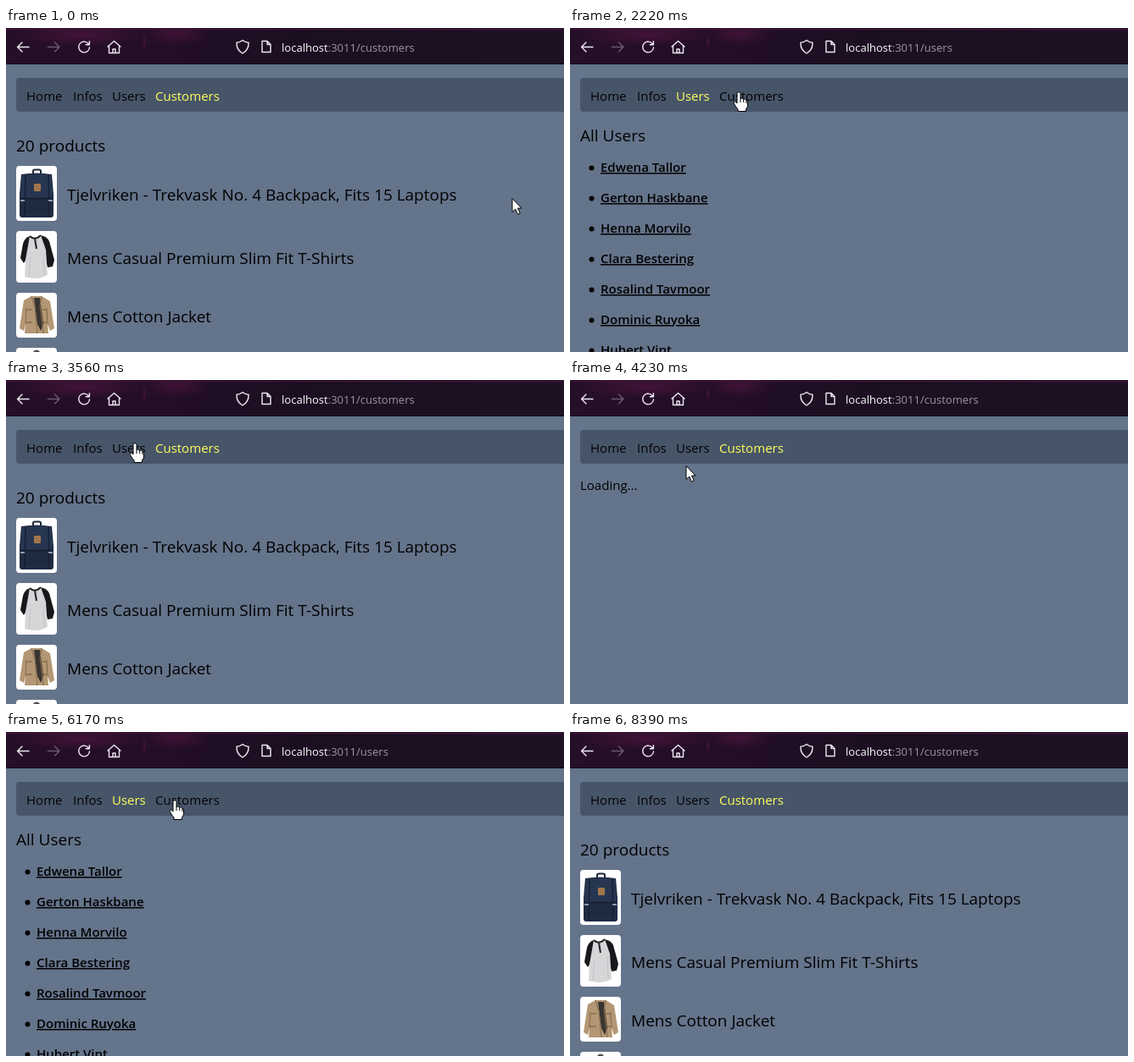
An HTML page for the animation above (8.7 s loop, 658 px wide and 383 px high).

```html
<!DOCTYPE html>
<html lang="en">
<head>
<meta charset="utf-8">
<title>Customers and users</title>
<style>
  html, body { margin: 0; width: 100%; height: 100%; overflow: hidden; background: #64748b; }
  svg { display: block; width: 658px; height: 383px; }
  text { font: 15px "Open Sans", "Noto Sans", sans-serif; white-space: pre; }
  .big { font-size: 19px; }
  .url { font-size: 13.05px; fill: #9c95a3; }
  .url .host { fill: #fbfbfe; }
  .person { font-size: 15px; font-weight: 600; }
  .icon { fill: none; stroke: #ece8f0; stroke-width: 1.4; stroke-linecap: round; stroke-linejoin: round; }
  .cursor { fill: #fff; stroke: #000; stroke-width: 1; stroke-linejoin: round; }
</style>
</head>
<body>
<svg viewBox="0 0 658 383">
  <defs>
    <linearGradient id="bar">
      <stop offset="0" stop-color="#260f28"/>
      <stop offset=".3" stop-color="#220e26"/>
      <stop offset=".55" stop-color="#1c0f21"/>
      <stop offset="1" stop-color="#1f1124"/>
    </linearGradient>
    <radialGradient id="glow">
      <stop offset="0" stop-color="#8a1d5c" stop-opacity=".3"/>
      <stop offset="1" stop-color="#8a1d5c" stop-opacity="0"/>
    </radialGradient>
  </defs>

  <rect width="658" height="383" fill="#64748b"/>
  <g id="toolbar">
    <rect width="658" height="43" fill="url(#bar)"/>
    <g fill="url(#glow)">
      <ellipse cx="90" cy="8" rx="80" ry="14"/>
      <ellipse cx="200" cy="7" rx="40" ry="14"/>
      <ellipse cx="163" cy="16" rx="3" ry="10"/>
    </g>
    <path d="M0 1.5H658" stroke="#47183f"/>
    <path d="M0 42.5H658" stroke="#100a15"/>
    <path class="icon" d="M27 22.500H13.500M19 17L13.500 22.500L19 28"/>
    <path class="icon" stroke-opacity=".35" d="M49.500 22.500H63M57.500 17L63 22.500L57.500 28"/>
    <path class="icon" d="M97.500 19A6.400 6.400 0 1 0 98.500 23M98.400 15.800V19.800H94.300"/>
    <path class="icon" d="M120 22L127.500 15.500L135 22M121.500 21V29.500H133.500V21M126 29.500V25H129V29.500"/>
    <path class="icon" d="M279 14.500Q282.500 17.300 286 17.300Q286.500 26 279 30Q271.500 26 272 17.300Q275.500 17.300 279 14.500Z"/>
    <path class="icon" d="M302 15.500H308L312 19.500V28.500H302ZM308 15.500V19.500H312"/>
    <text class="url" x="325" y="28"><tspan class="host">localhost</tspan>:3011/<tspan id="path">customers</tspan></text>
  </g>

  <rect x="12" y="59" width="660" height="40" rx="4" fill="#475569"/>
  <text x="24" y="86">Home</text>
  <text x="79" y="86">Infos</text>
  <text x="125" y="86" id="navUsers">Users</text>
  <text x="176" y="86" id="navCustomers">Customers</text>

  <text id="loading" x="12" y="130">Loading...</text>

  <g id="users">
    <text class="big" x="12" y="134">All Users</text>
  </g>

  <g id="customers">
    <text class="big" x="12" y="146">20 products</text>
    <g fill="#fff">
      <rect x="12" y="163" width="48" height="65" rx="4"/>
      <rect x="12" y="240" width="48" height="61" rx="4"/>
      <rect x="12" y="313" width="48" height="53" rx="4"/>
      <rect x="12" y="378" width="48" height="53" rx="4"/>
    </g>
    <g id="backpack">
      <path d="M32 173V169Q32 167.500 34 167.500H39Q41 167.500 41 169V173" fill="none" stroke="#1b2537" stroke-width="2"/>
      <path d="M18 173Q36 170 54 173L56 196V221Q56 224 53 224H19Q16 224 16 221V196Z" fill="#1f2b41"/>
      <path d="M19 174Q36 171 53 174L55 200H17Z" fill="#273650"/>
      <path d="M17 202H55M23 174L22 222M50 174L51 222" fill="none" stroke="#162036" stroke-width="1.500"/>
      <path d="M17 204H22M50 204H55" stroke="#b8c0cc" stroke-width="1.500"/>
      <rect x="33" y="184" width="8" height="9" rx="1" fill="#a2764c"/>
    </g>
    <g id="shirt">
      <path d="M28 246Q22 248 20 255L17 272L21 278L27 268Z" fill="#17181b"/>
      <path d="M41 245Q49 247 51 252L57 274L55 282L49 283L44 264Z" fill="#17181b"/>
      <path d="M28 246Q34 249 41 245L47 262L49 292Q37 299 22 294L23 274Z" fill="#d6d6d8"/>
      <path d="M28 246Q34 252 41 245M34 249L36 261" fill="none" stroke="#222327" stroke-width="2"/>
      <path d="M29 270L27 294M44 266L45 292" stroke="#c3c3c8"/>
    </g>
    <g id="jacket">
      <path d="M30 317L21 322L16 355L21 358L23 350L22 361L50 361L49 350L52 358L57 355L52 323L42 317Z" fill="#b39673"/>
      <path d="M33 319H40L44 350L41 358L37 350Z" fill="#3a3431"/>
      <path d="M30 317L34 330L37 361M42 317L40 328L44 361M23 350L24 331M49 350L48 331" fill="none" stroke="#846a4c"/>
      <path d="M25 333H31M43 333H48M24 348H31M44 348H48" stroke="#8b6e4b" stroke-width="1.500"/>
    </g>
    <path d="M32 383Q33 380.500 36 380.500Q39 380.500 40 383Z" fill="#4b5056"/>
    <text class="big" x="72" y="204">Tjelvriken - Trekvask No. 4 Backpack, Fits 15 Laptops</text>
    <text class="big" x="72" y="279">Mens Casual Premium Slim Fit T-Shirts</text>
    <text class="big" x="72" y="348">Mens Cotton Jacket</text>
  </g>

  <path id="arrow" class="cursor" d="M0 .500V16.500L3.700 13L6.500 19.300L9.300 18L6.500 12H11Z"/>
  <g id="hand" class="cursor">
    <path d="M-3 .500Q-3 -1.300 -1 -1.300Q1 -1.300 1 .500V7Q1.300 5.700 3 6Q4.700 6.300 4.700 8Q5.300 6.800 6.800 7.200Q8 7.600 8 9Q9.500 8.300 9.500 10.500V14Q9.500 17 7.500 19V21.500H-2V19Q-4.500 16.500 -6.500 12.500Q-7.500 10 -6 9.800Q-4.500 9.700 -3 12Z"/>
    <path d="M1 7V11M4.700 8V11M8 9V12" fill="none"/>
  </g>
</svg>

<script>
const LOOP = 8700;
const $ = id => document.getElementById(id);
const show = (id, on) => $(id).style.display = on ? "" : "none";

const people = ["Edwena Tallor", "Gerton Haskbane", "Henna Morvilo", "Clara Bestering",
                "Rosalind Tavmoor", "Dominic Ruyoka", "Hubert Vint"];

function addShape(parent, tag, attributes, text = "") {
  const node = document.createElementNS("http://www.w3.org/2000/svg", tag);
  for (const name in attributes) node.setAttribute(name, attributes[name]);
  node.textContent = text;
  parent.append(node);
}

people.forEach((name, i) => {
  const y = 170 + 36 * i;
  addShape($("users"), "circle", { cx: 25.5, cy: y - 4.5, r: 3 });
  addShape($("users"), "text", { x: 36, y, class: "person", "text-decoration": "underline" }, name);
});

// [time, route, is loading]
const pages = [
  [0, "customers", false],
  [1700, "users", true], [1850, "users", false],
  [2490, "customers", true], [2610, "customers", false],
  [3710, "users", false],
  [4230, "customers", true], [4380, "customers", false],
  [5790, "users", true], [5920, "users", false],
  [6450, "customers", true], [6580, "customers", false]
];

// [time, cursor shape, tip x, tip y]
const pointer = [
  [0, "arrow", 597, 201],
  [590, "arrow", 560, 190], [720, "arrow", 440, 158], [860, "arrow", 300, 124],
  [1000, "arrow", 190, 100], [1130, "arrow", 143, 92],
  [1430, "hand", 150, 78],
  [1980, "hand", 172, 77], [2220, "hand", 200, 77],
  [2730, "hand", 244, 76],
  [3160, "hand", 200, 76], [3280, "hand", 153, 76],
  [3710, "hand", 170, 76], [3860, "hand", 198, 77],
  [4230, "arrow", 137, 101], [4380, "arrow", 126, 108], [4510, "arrow", 115, 116], [4650, "arrow", 108, 122],
  [4930, "arrow", 128, 120], [5070, "arrow", 160, 114], [5220, "arrow", 182, 106],
  [5370, "arrow", 164, 99], [5520, "hand", 150, 80],
  [6040, "hand", 178, 81], [6170, "hand", 200, 82],
  [6710, "hand", 196, 82], [6840, "arrow", 186, 99], [6970, "arrow", 176, 104],
  [7110, "arrow", 165, 103], [7240, "arrow", 157, 99], [7370, "arrow", 151, 95],
  [7490, "arrow", 182, 89],
  [7610, "arrow", 220, 112], [7740, "arrow", 275, 146], [7870, "arrow", 350, 198],
  [8000, "arrow", 430, 254], [8130, "arrow", 502, 304], [8260, "arrow", 551, 339],
  [8390, "none", 0, 0]
];

const stateAt = (steps, time) => steps.findLast(step => step[0] <= time);

function draw(now) {
  const time = now % LOOP;
  const [, route, loading] = stateAt(pages, time);
  const [, shape, x, y] = stateAt(pointer, time);

  $("path").textContent = route;
  show("loading", loading);
  for (const name of ["users", "customers"]) {
    show(name, !loading && route === name);
    $("nav" + name[0].toUpperCase() + name.slice(1)).setAttribute("fill", route === name ? "#ffff5c" : "#000");
  }
  for (const name of ["arrow", "hand"]) {
    show(name, shape === name);
    $(name).setAttribute("transform", `translate(${x} ${y})`);
  }
}

const start = performance.now();
function tick() {
  draw(performance.now() - start);
  requestAnimationFrame(tick);
}
tick();
</script>
</body>
</html>
```
